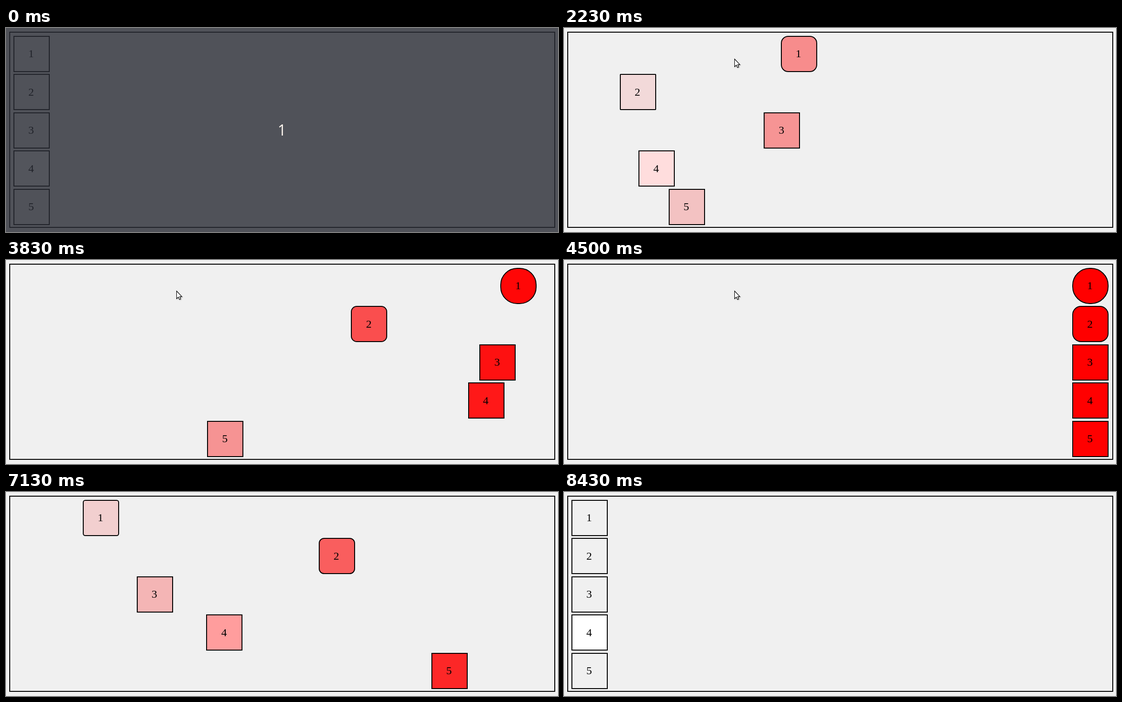
An HTML page for the animation above (9360 ms loop, 1186 by 440 pixels).

```html
<!DOCTYPE html>
<html lang="en">
<head>
<meta charset="utf-8">
<title>Timing functions</title>
<style>
  html, body {
    margin: 0;
    width: 100%;
    height: 100%;
    overflow: hidden;
    background: #f0f0f0;
  }
  body { position: relative; }
  body * { position: absolute; box-sizing: border-box; }

  .track {
    left: 7px;
    top: 8px;
    width: 1173px;
    height: 423px;
    border: 2px solid #000;
  }

  .box {
    left: 16px;
    width: 78px;
    height: 78px;
    border: 2px solid #000;
    font: 24px/72px "Liberation Serif", serif;
    text-indent: 30px;
    color: #000;
    --rest: transparent;
    --radius: 0px;
    animation: slide 9360ms var(--ease) infinite;
  }
  .b1 { top: 17px;  --ease: ease; --radius: 37.5px; }
  .b2 { top: 99px;  --ease: ease-in; --radius: 18.75px; line-height: 74px; }
  .b3 { top: 182px; --ease: ease-out; }
  .b4 { top: 264px; --ease: ease-in-out; --rest: #fff; line-height: 74px; }
  .b5 { top: 347px; --ease: cubic-bezier(.7, .7, .5, -.6); }

  /* 3 s each way: out at 1468 ms, back at 5429 ms */
  @keyframes slide {
    0%, 15.684%, 90.053%, 100% {
      left: 16px;
      background-color: var(--rest);
      border-radius: 0;
    }
    47.735%, 58.002% {
      left: 1092px;
      background-color: #f00;
      border-radius: var(--radius);
    }
  }

  .pointer {
    left: 364px;
    top: 64px;
    filter: drop-shadow(1px 1px 1px rgba(0, 0, 0, .25));
    animation: hover 9360ms step-end infinite;
  }
  @keyframes hover {
    0%, 57.692% { visibility: hidden; }
    15.705% { visibility: visible; }
  }

  .title {
    inset: 0;
    background: rgba(40, 43, 52, .8);
    color: #fff8f0;
    font: 32px/440px "Open Sans", "Noto Sans", sans-serif;
    text-align: center;
    animation: title 9360ms step-end infinite;
  }
  @keyframes title {
    0% { visibility: visible; }
    .3205%, 100% { visibility: hidden; }
  }
</style>
</head>
<body>
  <div class="track"></div>
  <div class="box b1">1</div>
  <div class="box b2">2</div>
  <div class="box b3">3</div>
  <div class="box b4">4</div>
  <div class="box b5">5</div>
  <svg class="pointer" width="20" height="26">
    <path d="M2.5 3V19.5L6.3 16L8.7 21.3L11.4 20.2L9.1 15.1H14Z" fill="#fff" stroke="#000" stroke-width="1.1"/>
  </svg>
  <div class="title">1</div>
</body>
</html>
```
